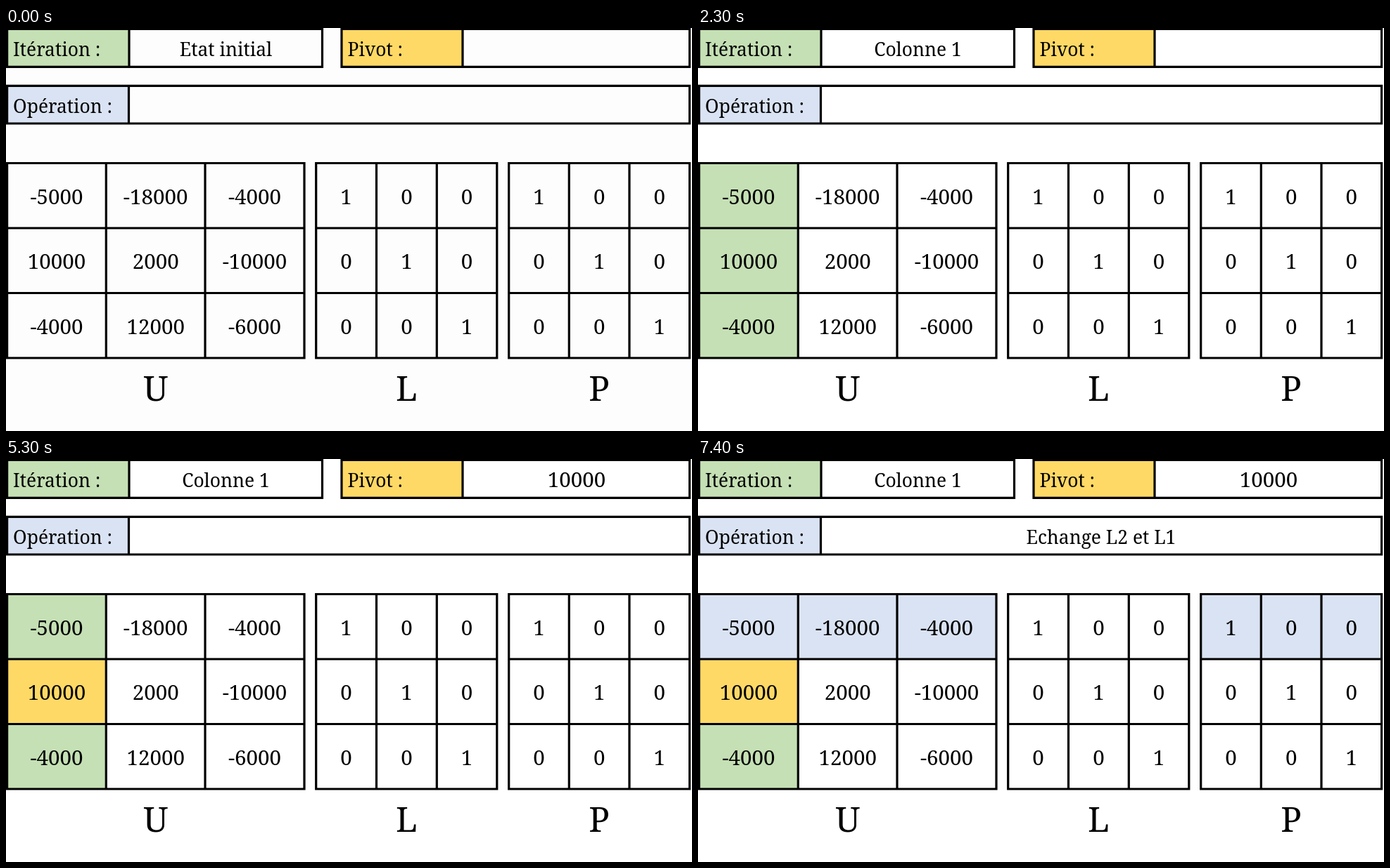
These frames come from a looping animation (975x574 px, 8 s). An HTML page:

```html
<!DOCTYPE html>
<html lang="fr">
<head>
<meta charset="utf-8">
<title>Décomposition LU</title>
<style>
  html, body { margin: 0; width: 100%; height: 100%; overflow: hidden; background: #fff; }
  svg { display: block; width: 100%; height: 100%; }
  text { font: 26.4px "Noto Serif", serif; fill: #000; }
  .num { font-size: 29.5px; }
  .name { font-size: 49px; }
  .mid { text-anchor: middle; }
  .lines { fill: none; stroke: #000; stroke-width: 3.2; }
  .green { fill: #c5e0b4; }
  .yellow { fill: #ffd966; }
  .blue { fill: #dae3f3; }
  .paper { fill: #fdfdfd; }

  .start, .column, .pivot, .swap { animation: 8s step-end infinite; }
  .start { animation-name: start; }
  .column { animation-name: column; }
  .pivot { animation-name: pivot; }
  .swap { animation-name: swap; }
  @keyframes start { 0% { opacity: 1 } 6.25%, 100% { opacity: 0 } }
  @keyframes column { 0% { opacity: 0 } 6.25%, 100% { opacity: 1 } }
  @keyframes pivot { 0% { opacity: 0 } 43.75%, 100% { opacity: 1 } }
  @keyframes swap { 0% { opacity: 0 } 81.25%, 100% { opacity: 1 } }
</style>
</head>
<body>
<svg id="stage" viewBox="0 0 975 574"></svg>
<script>
  const rows = [192.5, 285, 377.5, 470];
  const U = [1.6, 142.3, 283, 424];
  const L = [440.7, 526.5, 612.3, 697.8];
  const P = [714.7, 800.3, 886, 971.6];
  const unit = [[1, 0, 0], [0, 1, 0], [0, 0, 1]];

  const rect = (x1, y1, x2, y2, cls) =>
    `<rect x="${x1}" y="${y1}" width="${x2 - x1}" height="${y2 - y1}" class="${cls}"/>`;
  const text = (x, y, str, cls = "") => `<text x="${x}" y="${y}" class="${cls}">${str}</text>`;
  const lines = (xs, ys) => {
    const [x1, x2, y1, y2] = [xs[0], xs.at(-1), ys[0], ys.at(-1)];
    const d = xs.slice(1, -1).map(x => `M${x} ${y1}V${y2}`)
      .concat(ys.slice(1, -1).map(y => `M${x1} ${y}H${x2}`)).join("");
    return `<path class="lines" d="M${x1} ${y1}H${x2}V${y2}H${x1}Z${d}"/>`;
  };

  const field = (label, xs, ys, color) =>
    rect(xs[0], ys[0], xs[1], ys[1], color) + lines(xs, ys) +
    text(xs[0] + 8.5, ys[0] + 38.3, label);

  const matrix = (name, xs, values) =>
    lines(xs, rows) +
    values.map((row, r) => row.map((v, c) =>
      text((xs[c] + xs[c + 1]) / 2, (rows[r] + rows[r + 1]) / 2 + 11.8, v, "num mid")
    ).join("")).join("") +
    text((xs[0] + xs[3]) / 2, 531, name, "name mid");

  document.getElementById("stage").innerHTML = [
    rect(0, 0, 975, 574, "paper start"),
    rect(U[0], rows[0], U[1], rows[3], "green column"),
    rect(U[0], rows[1], U[1], rows[2], "yellow pivot"),
    rect(U[0], rows[0], U[3], rows[1], "blue swap"),
    rect(P[0], rows[0], P[3], rows[1], "blue swap"),

    field("Itération :", [1.6, 175, 449.5], [1.5, 55.3], "green"),
    field("Pivot :", [477, 649, 971.6], [1.5, 55.3], "yellow"),
    field("Opération :", [1.6, 174.5, 971.6], [82.3, 136], "blue"),
    text(312.5, 39.8, "Etat initial", "mid start"),
    text(312.5, 39.8, "Colonne 1", "mid column"),
    text(811, 40.3, "10000", "num mid pivot"),
    text(573, 120.6, "Echange L2 et L1", "mid swap"),

    matrix("U", U, [[-5000, -18000, -4000], [10000, 2000, -10000], [-4000, 12000, -6000]]),
    matrix("L", L, unit),
    matrix("P", P, unit)
  ].join("");
</script>
</body>
</html>
```
